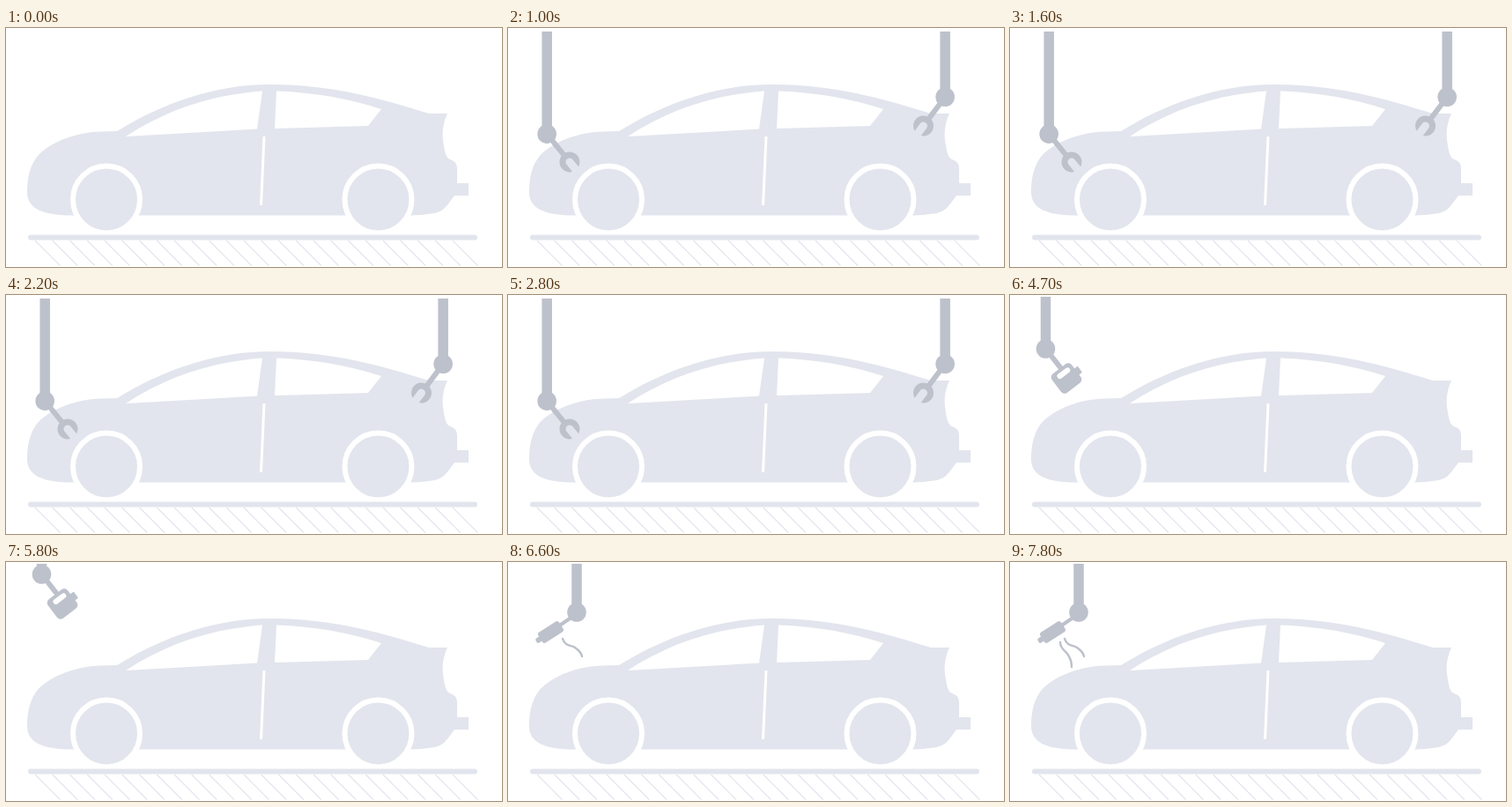
These frames come from a looping animation (563 by 271 pixels, 8 s). An HTML page:

```html
<!DOCTYPE html>
<html lang="en">
<head>
<meta charset="utf-8">
<title>Car service</title>
<style>
html, body { margin: 0; width: 100%; height: 100%; overflow: hidden; background: #fff; }
svg { display: block; width: 563px; height: 271px; }
</style>
</head>
<body>
<svg viewBox="0 0 563 271">
  <clipPath id="view"><rect y="2" width="563" height="269"/></clipPath>
  <g fill="#e2e5ed">
    <path d="M24 186C24 164 30 149 41 140C58 126 84 118 107 117.5L126 117C176 86 236 64 300 64C372 64 428 81 480 97H501C496 108 495 119 496 127C498 140 499 147 504 149Q512 151 512 159V176H525V190H509C500 202 497 209 483 210.500Q471 212.500 460 212.500H76C42 212.500 24 205 24 186Z"/>
    <path fill="#fff" d="M136 123C180 94 231 76 291 71.500L285 114.500ZM307 71.500C349 73 390 80 426 92L411 111L305 114Z"/>
    <path stroke="#fff" stroke-width="3" d="M293 123L289.500 201"/>
    <g stroke="#fff" stroke-width="6">
      <circle cx="114" cy="194.500" r="38"/>
      <circle cx="422.500" cy="194.500" r="38"/>
    </g>
    <path stroke="#e2e5ed" stroke-width="6" stroke-linecap="round" d="M28 237.500H532"/>
    <path id="hatch" stroke="#e2e5ed" stroke-width="1.200"/>
  </g>
  <g clip-path="url(#view)"><g id="tool" fill="#bdc1cb" stroke="none"></g></g>
</svg>
<script>
const GREY = '#bdc1cb', LOOP = 8000;
const tool = document.getElementById('tool');

let hatch = '';
for (let i = 0; i < 25; i++) hatch += `M${33 + i * 19.75} 241l28.500 28.500`;
document.getElementById('hatch').setAttribute('d', hatch);

const line = (d, width, color = GREY) =>
  `<path d="${d}" fill="none" stroke="${color}" stroke-width="${width}" stroke-linecap="round"/>`;

// Vertical rod ending in a round joint
const rod = (x, y, top = 2) =>
  `<rect x="${x - 5.75}" y="${top}" width="11.500" height="${Math.max(0, y - top)}"/>` +
  `<circle cx="${x}" cy="${y}" r="10.800"/>`;

// The rod swings around the wrench head
function wrench(x, y, angle, top) {
  const a = angle * Math.PI / 180, len = 41;
  return rod(x + len * Math.sin(a), y - len * Math.cos(a), top) +
    `<g transform="translate(${x} ${y}) rotate(${angle})">
      <path d="M-3-41H3V-7H-3ZM4.500 10.500V0A4.500 4.500 0 0 0-4.500 0V10.500A11.500 11.500 0 1 1 4.500 10.500Z"/></g>`;
}

function wrenches(turned, shift = 0) {
  const y = shift, top = turned ? 4 : 2;
  return wrench(70, 152 + y, turned ? -39 : -10, top) +
    wrench(471.5, 111 + y, turned ? 37 : 6, top);
}

function jug(pouring, shift = 0, drop = false) {
  const y = shift + (pouring ? 65 : 61);
  return rod(40.5, y) + line(`M40.500 ${y}l18 23`, 6) +
    `<g transform="translate(64 ${shift + (pouring ? 96 : 94.5)}) rotate(${pouring ? 15 : -37})">
      <rect x="-14" y="-13.500" width="28" height="27" rx="5"/>
      <rect x="12" y="-3.500" width="6.500" height="9" rx="1"/>
      ${line('M-4.500-6.500H6.500', 6, '#fff')}</g>` +
    (drop ? '<path d="M81.500 101C83 104 86 106 86 108.700A4.500 4.300 0 0 1 77 108.700C77 106 80 104 81.500 101Z"/>' : '');
}

const WAVES = [
  'M62 87C65 96 72 94 76 97S83 102 84 107',
  'M57 91C57 98 62 100 65 104S70 112 70 119',
  'M47 97C44 103 45 107 47 111S49 118 48 123'
];

function dryer(waves, shift = 0) {
  return `<g transform="translate(0 ${shift})">${rod(78, 57, 2 - shift)}
    ${line('M76 60L60 71', 4)}
    <g transform="translate(48.500 79.500) rotate(-33)">
      <rect x="-14" y="-7" width="28" height="14" rx="3"/>
      <rect x="-19.500" y="-3" width="8" height="6" rx="2"/></g>
    ${WAVES.slice(0, waves).map(d => line(d, 2.4)).join('')}</g>`;
}

function scene(t) {
  if (t < 200) return '';
  if (t < 400) return wrenches(false, -70);
  if (t < 3100) return wrenches(Math.floor((t - 400) / 300) % 2 === 0);
  if (t < 3300) return wrenches(false);
  if (t < 3500) return wrenches(false, -70);
  if (t < 3700) return '';
  if (t < 3900) return jug(false, -47);
  if (t < 4100) return jug(false);
  if (t < 5600) {
    const step = Math.floor((t - 4100) / 300) % 3;
    return jug(step < 2, 0, step === 1);
  }
  if (t < 5800) return jug(false);
  if (t < 6000) return jug(false, -47);
  if (t < 6200) return '';
  if (t < 6400) return dryer(0, -47);
  if (t < 6600) return dryer(0);
  return dryer(1 + Math.floor((t - 6600) / 300) % 3);
}

const start = performance.now();
let shown = null;
function frame() {
  const next = scene((performance.now() - start) % LOOP);
  if (next !== shown) tool.innerHTML = shown = next;
  requestAnimationFrame(frame);
}
frame();
</script>
</body>
</html>
```
